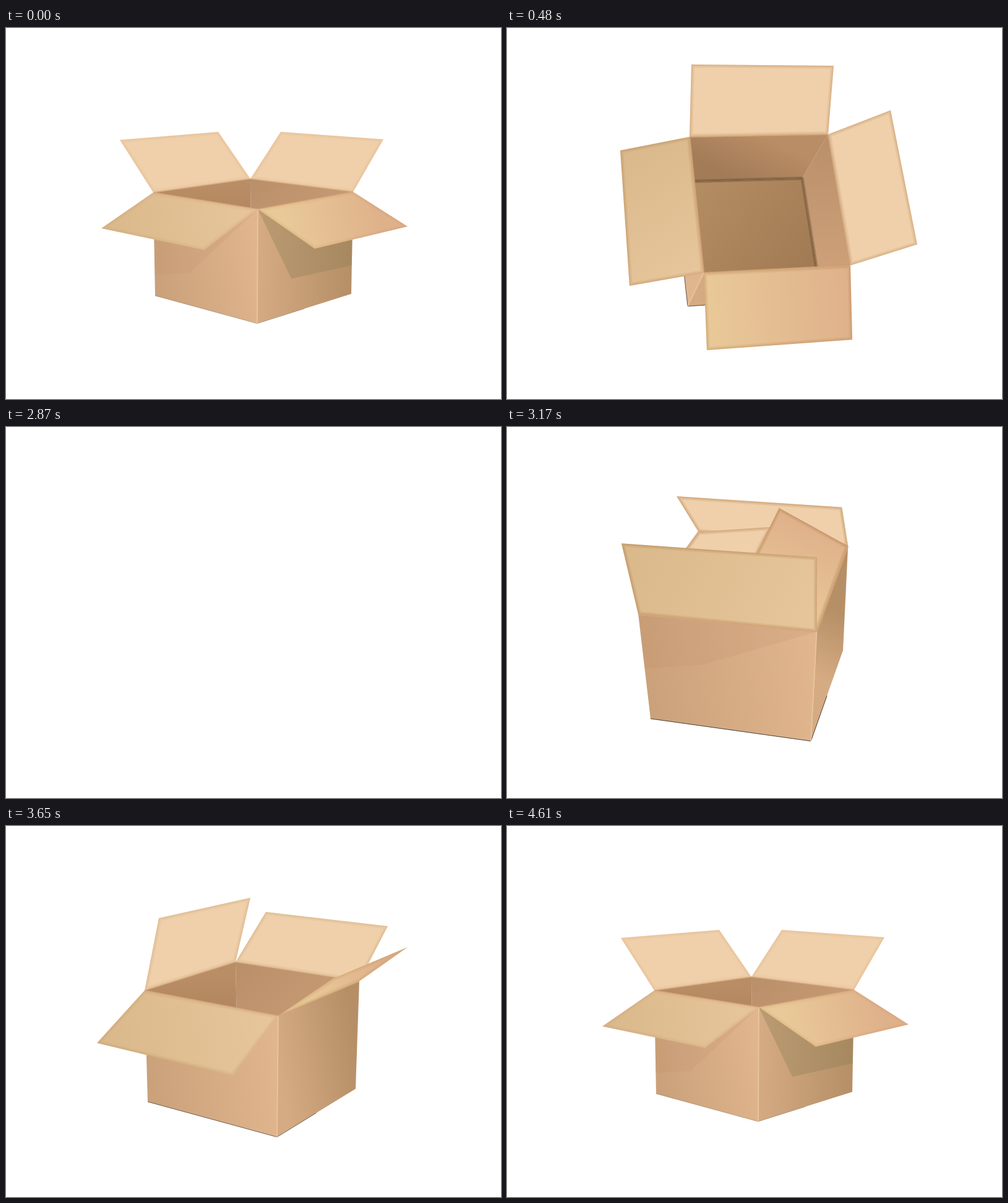
Write an HTML page with a canvas that moves like this. It is 800x600 px and loops after 4640 ms.

```html
<!DOCTYPE html>
<html>
<head>
<meta charset="utf-8">
<title>Cardboard box</title>
<style>
html, body { margin: 0; width: 100%; height: 100%; overflow: hidden; background: #fff; }
canvas { display: block; }
</style>
</head>
<body>
<canvas id="stage" width="800" height="600"></canvas>
<script>
const ctx = document.getElementById('stage').getContext('2d');
const LOOP = 4640, TURN = 480, TOP = 690, ENTER = 2870, TILT = 3350, OPEN = 3650, FLAPS = 3930, REST = 4610;

// Pose: rim corners (left, front, right, back), floor corners, then two tips per flap.
const pairs = (...n) => Array.from({ length: n.length / 2 }, (_, i) => [n[2 * i], n[2 * i + 1]]);

const rest = pairs(
  238,266, 407,293, 561,265, 395,244,  241,433, 406,478, 558,430, 396,375,
  154,324, 320,359,  499,357, 649,321,  610,180, 444,168,  343,168, 184,181);
const turn = pairs(
  295,176, 318,396, 555,384, 519,172,  270,249, 292,450, 508,436, 477,243,
  183,198, 198,417,  323,521, 558,504,  663,350, 620,133,  528,61, 298,59);
const above = pairs(
  266,155, 267,439, 549,438, 549,155,  279,176, 279,423, 527,423, 527,176,
  142,161, 142,436,  270,563, 545,561,  672,448, 671,143,  562,34, 257,34);
const tilt = pairs(
  205,287, 474,329, 570,227, 333,193,  221,473, 474,528, 566,398, 338,350,
  126,298, 415,350,  371,225, 475,133,  573,97, 326,73,  445,180, 338,274);
const open = pairs(
  224,266, 440,307, 571,251, 371,220,  229,446, 438,503, 565,425, 374,372,
  147,351, 367,404,  528,247, 649,196,  617,162, 420,139,  395,116, 247,149);
const closed = pairs(
  224,330, 545,335, 520,135, 270,130,  250,470, 520,475, 505,300, 285,300);

const lerp = (a, b, u) => a + (b - a) * u;
const clamp = x => Math.max(0, Math.min(1, x));
const mid = (a, b, u = .5) => [lerp(a[0], b[0], u), lerp(a[1], b[1], u)];
const mix = (p, q, u) => p.map((a, i) => mid(a, q[i], u));

// Outward and upward directions in which a flap tip swings around its hinge.
function swing(p, j) {
  const side = j >> 1, end = j & 1;
  const h = p[(side + end) % 4], o = p[(side + 3 - end) % 4], b = p[(side + end) % 4 + 4];
  return { h, out: [(h[0] - o[0]) * .5, (h[1] - o[1]) * .5], up: [(h[0] - b[0]) * .7, (h[1] - b[1]) * .7] };
}
function angles(p) {
  return p.slice(8).map((tip, j) => {
    const { h, out, up } = swing(p, j);
    const x = tip[0] - h[0], y = tip[1] - h[1], det = out[0] * up[1] - out[1] * up[0];
    const c = (x * up[1] - y * up[0]) / det, s = (out[0] * y - out[1] * x) / det;
    return [Math.atan2(s, c), Math.hypot(c, s)];
  });
}
function withFlaps(body, polar) {
  return body.concat(polar.map(([a, r], j) => {
    const { h, out, up } = swing(body, j), c = r * Math.cos(a), s = r * Math.sin(a);
    return [h[0] + c * out[0] + s * up[0], h[1] + c * out[1] + s * up[1]];
  }));
}
const body = p => p.slice(0, 8);
const shut = Array(8).fill([Math.PI, 1]);
const tiltA = angles(tilt), openA = angles(open), restA = angles(rest);

function stateAt(t) {
  const s = { scale: 1, folded: false };
  if (t < TURN) {
    const u = t / TURN;
    return { ...s, p: mix(rest, turn, u), soft: .4 * u, shade: 1 - u, ink: lerp(.25, .7, u) };
  }
  if (t < ENTER) {
    const u = clamp((t - TURN) / (TOP - TURN)) ** 1.3;
    return { ...s, p: mix(turn, above, u), soft: lerp(.4, 1, u), shade: 0, ink: .7 * (1 - u) };
  }
  if (t < TILT) {
    const u = (t - ENTER) / (TILT - ENTER);
    const polar = mix(shut, tiltA, u);
    return { p: withFlaps(mix(body(closed), body(tilt), u), polar), soft: .6, shade: 0, ink: .8,
      scale: 1 - (1 - clamp((t - ENTER) / 330)) ** 3, folded: polar[4][0] > 2.2 };
  }
  if (t < OPEN) {
    const u = (t - TILT) / (OPEN - TILT);
    return { ...s, p: withFlaps(mix(body(tilt), body(open), u), mix(tiltA, openA, u)),
      soft: lerp(.6, .15, u), shade: 0, ink: lerp(.8, .6, u) };
  }
  const u = clamp((t - OPEN) / (REST - OPEN)), f = clamp((t - OPEN) / (FLAPS - OPEN));
  return { ...s, p: withFlaps(mix(body(open), body(rest), u), mix(openA, restA, f)),
    soft: .15 * (1 - u), shade: f, ink: lerp(.6, .25, u) };
}

function trace(q) {
  ctx.beginPath();
  q.forEach(v => ctx.lineTo(v[0], v[1]));
  ctx.closePath();
}
function grad(a, b, c0, c1) {
  const g = ctx.createLinearGradient(a[0], a[1], b[0], b[1]);
  g.addColorStop(0, c0);
  g.addColorStop(1, c1);
  return g;
}
function fill(q, style) {
  trace(q);
  ctx.fillStyle = style;
  ctx.fill();
}
function line(a, b, color, width) {
  ctx.beginPath();
  ctx.moveTo(a[0], a[1]);
  ctx.lineTo(b[0], b[1]);
  ctx.strokeStyle = color;
  ctx.lineWidth = width;
  ctx.stroke();
}
// Darkens the inside of the border for a rounded look.
function softEdge(q, soft) {
  ctx.save();
  trace(q);
  ctx.clip();
  for (const w of [3, 6, 10]) {
    ctx.lineWidth = w;
    ctx.strokeStyle = `rgba(165,115,65,${.04 + .18 * soft})`;
    ctx.stroke();
  }
  ctx.restore();
}
function area(q) {
  return q.reduce((sum, a, i) => {
    const b = q[(i + 1) % q.length];
    return sum + a[0] * b[1] - b[0] * a[1];
  }, 0);
}
const wall = (p, i) => [p[i], p[(i + 1) % 4], p[(i + 1) % 4 + 4], p[i + 4]];

function flap(p, i, soft) {
  const a = p[i], b = p[(i + 1) % 4], ta = p[8 + 2 * i], tb = p[9 + 2 * i];
  const q = [a, b, tb, ta];
  const paint = i == 0 ? grad(ta, b, '#d9b88b', '#e8c69c')
    : i == 1 ? grad(mid(a, ta), mid(b, tb), '#e9c998', '#dfb18b') : '#efd0ab';
  fill(q, paint);
  softEdge(q, soft);
  line(a, b, `rgba(213,168,125,${.9 - .3 * soft})`, 1.5 + 1.5 * soft);
}
function interior(p, soft) {
  const floor = p.slice(4, 8);
  ctx.save();
  trace(p.slice(0, 4));
  ctx.clip();
  fill(floor, grad(p[4], p[6], '#b78f66', '#9d7750'));
  const paint = [
    q => grad(q[0], q[3], '#cfa47c', '#c79b72'),
    q => grad(q[0], q[1], '#d0a57b', '#c99d76'),
    q => grad(q[1], q[3], '#b98f69', '#d1a47d'),
    q => grad(mid(q[0], q[1]), mid(q[2], q[3]), '#b98d65', '#a27b57')
  ];
  for (let i = 0; i < 4; i++) {
    const q = wall(p, i);
    if (area(q) < 0) fill(q, paint[i](q));
  }
  for (const w of [2, 4, 6]) {
    trace(floor);
    ctx.lineWidth = w;
    ctx.strokeStyle = `rgba(95,68,42,${.28 * Math.min(1, soft * 2)})`;
    ctx.stroke();
  }
  trace(p.slice(0, 4));
  ctx.lineWidth = 2 + 5 * soft;
  ctx.strokeStyle = `rgba(190,145,103,${.35})`;
  ctx.stroke();
  ctx.restore();
}
function outside(p, shade, ink) {
  const left = wall(p, 0), right = wall(p, 1);
  const at = (q, u, v) => mid(mid(q[0], q[1], u), mid(q[3], q[2], u), v);
  const dark = `rgba(35,24,14,${ink})`;
  if (area(left) > 0) {
    fill(left, grad(at(left, 0, .7), at(left, 1, .3), '#caa17a', '#e1b68f'));
    const v = lerp(.42, .7, shade);
    fill([left[0], left[1], at(left, .34, v), at(left, 0, v + .1)], 'rgba(190,138,108,.2)');
    line(left[3], left[2], dark, 1);
  }
  if (area(right) > 0) {
    fill(right, grad(at(right, 0, .4), at(right, 1, .65), '#d5ab83', '#b68f67'));
    if (shade > 0)
      fill([right[0], right[1], at(right, 1, .72), at(right, .36, .69)], `rgba(140,125,85,${.36 * shade})`);
    line(right[3], mid(right[3], right[2]), dark, 1);
  }
  if (area(left) > 0 && area(right) > 0) line(p[1], p[5], '#e9c7a2', 1.6);
}

function draw(t) {
  const { p, soft, shade, ink, scale, folded } = stateAt(t);
  ctx.setTransform(1, 0, 0, 1, 0, 0);
  ctx.fillStyle = '#fff';
  ctx.fillRect(0, 0, 800, 600);
  if (scale <= 0) return;
  ctx.setTransform(scale, 0, 0, scale, 400 * (1 - scale), 310 * (1 - scale));
  ctx.lineJoin = 'round';
  interior(p, soft);
  if (!folded) flap(p, 2, soft);
  flap(p, 3, soft);
  outside(p, shade, ink);
  flap(p, 1, soft);
  if (folded) flap(p, 2, soft);
  flap(p, 0, soft);
}

// The motion advances in 30 ms steps, with a pause on the view from above.
function stepped(t) {
  if (t < ENTER) return Math.min(TOP, Math.floor(t / 30) * 30);
  return ENTER + Math.floor((t - ENTER) / 30) * 30;
}
const start = performance.now();
function tick() {
  draw(stepped((performance.now() - start) % LOOP));
  requestAnimationFrame(tick);
}
tick();
</script>
</body>
</html>
```
